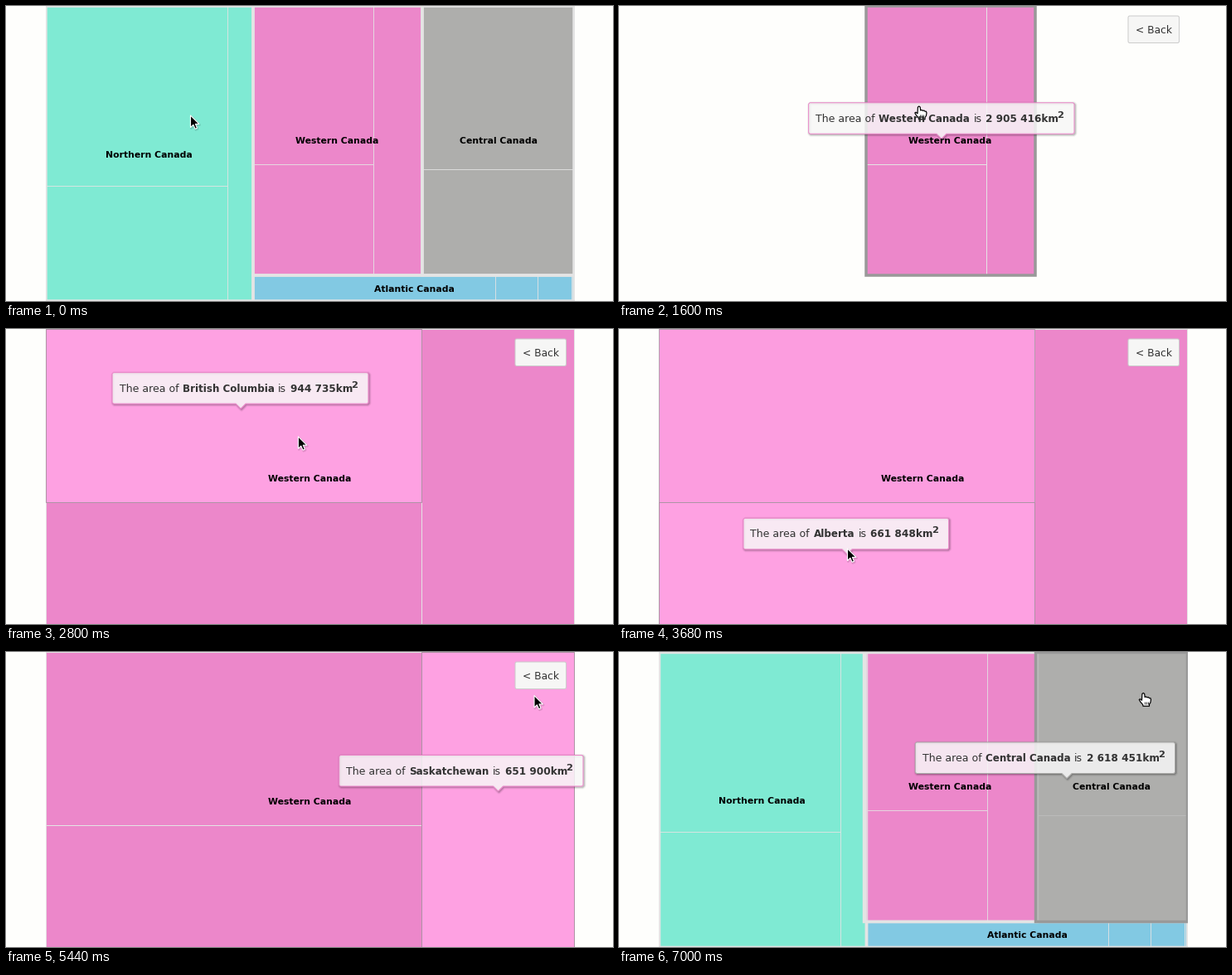
Write a matplotlib script that moves like this. It is 732x356 px and loops after 7040 ms.

```python
import numpy as np
import matplotlib.pyplot as plt
from matplotlib.animation import FuncAnimation
from matplotlib.colors import to_rgb
from matplotlib.patches import Polygon, Rectangle, FancyBboxPatch

W, H, DPI = 732, 356, 100
STEP, LOOP = 40, 7040
PX = 72 / DPI

TEAL, PINK, GRAY, BLUE = "#7fead3", "#ec87ca", "#aeaeac", "#82c9e3"
BRIGHT, LINE, HOT = "#fea1e2", "#e4e4e4", "#999999"
HOT_LEAF = "#ae94a5"
PAPER = "#fefefc"

# Treemap edges
X0, X1, X2, X3 = 47.5, 298.2, 502, 685
Y0, Y1, Y2 = -0.5, 325, 356

DRILL, BACK = 1600, 6040
TO_WEST, TO_BC, TO_ALB, TO_SASK, TO_CENTRAL = 560, 2640, 3440, 4350, 6950
FADE = 1000

fig = plt.figure(figsize=(W / DPI, H / DPI), dpi=DPI, facecolor=PAPER)
ax = fig.add_axes([0, 0, 1, 1])
ax.set_xlim(0, W)
ax.set_ylim(H, 0)
ax.axis("off")
plot_area = Rectangle((48, 0), 637.5, H, transform=ax.transData)


def swing(u):
    return 0.5 - 0.5 * np.cos(np.pi * np.clip(u, 0, 1))


def lerp(a, b, u):
    return np.asarray(a, float) * (1 - u) + np.asarray(b, float) * u


def mix(a, b, u):
    return tuple(lerp(to_rgb(a), to_rgb(b), u))


def heat(t, start, end):
    """1 while hovered, easing back to 0 afterwards."""
    if t < start:
        return 0.0
    return 1 - swing((t - end) / FADE)


def zoom(t, length):
    """0 for the whole map, 1 when Western Canada fills the plot."""
    if t < BACK:
        return swing((t - DRILL - 16) / length)
    return 1 - swing((t - BACK - 28) / length)


# ---------- drawing helpers ----------

def box(l, t, r, b, fill="none", edge="none", lw=1.0, alpha=1.0):
    p = Rectangle((l, t), r - l, b - t, fc=fill, ec=edge, lw=lw * PX,
                  alpha=alpha, joinstyle="miter")
    ax.add_patch(p)
    p.set_clip_path(plot_area)


def poly(pts, fill="none", edge="none", lw=1.0, alpha=1.0):
    ax.add_patch(Polygon(pts, closed=True, fc=fill, ec=edge, lw=lw * PX,
                         alpha=alpha, joinstyle="round"))


def text(x, y, s, px, weight="normal", color="black", ha="left"):
    return ax.text(x, y, s, fontsize=px * PX, family="DejaVu Sans",
                   weight=weight, color=color, ha=ha, va="baseline")


def width(s, px, weight):
    art = text(0, 0, s, px, weight)
    w = art.get_window_extent(fig.canvas.get_renderer()).width
    art.remove()
    return w


# ---------- tooltip ----------

class Tip:
    PAD_L, PAD_R, GAP = 8.5, 12.5, 4.5

    def __init__(self, name, area, color):
        self.color = color
        self.runs = []
        x = self.PAD_L
        for s, px, weight in (("The area of", 12.5, "normal"),
                              (name, 11.9, "bold"),
                              ("is", 12.5, "normal"),
                              (area + "km", 12.1, "bold")):
            self.runs.append((x, 0, s, px, weight))
            x += width(s, px, weight) + self.GAP
        x -= self.GAP + 1.5
        self.runs.append((x, -5, "2", 11.5, "bold"))
        self.w = x + width("2", 11.5, "bold") + self.PAD_R

    def target(self, cx, cy):
        return np.array([np.clip(cx - self.w / 2, 38, 696 - self.w), cy, cx])

    def draw(self, left, cy, tip_x):
        l, r, t, b, c = left, left + self.w, cy - 53, cy - 15.5, 1.5
        pts = [(l + c, t), (r - c, t), (r, t + c), (r, b - c), (r - c, b)]
        if l + 10 < tip_x < r - 10:
            pts += [(tip_x + 6, b), (tip_x, b + 6), (tip_x - 6, b)]
        pts += [(l + c, b), (l, b - c), (l, t + c)]
        pts = np.array(pts)
        for i in (1, 2, 3):
            poly(pts + 1, edge="black", lw=7 - 2 * i, alpha=0.05 * i)
        poly(pts, fill="#f7f7f7", alpha=0.85)
        poly(pts, edge=self.color)
        for dx, dy, s, px, weight in self.runs:
            text(l + dx, cy - 30 + dy, s, px, weight, "#333333")


north = Tip("Northern Canada", "3 921 739", TEAL)
west = Tip("Western Canada", "2 905 416", PINK)
bc = Tip("British Columbia", "944 735", PINK)
alberta = Tip("Alberta", "661 848", PINK)
sask = Tip("Saskatchewan", "651 900", PINK)
central = Tip("Central Canada", "2 618 451", GRAY)

TIPS = [
    (160, north, 172.5, 178),
    (TO_WEST, west, 400, 162),
    (DRILL, west, 366.5, 177.5),
    (TO_BC, bc, 275, 104.5),
    (TO_ALB, alberta, 275, 282),
    (TO_SASK, sask, 593.5, 177.5),
    (BACK, sask, 472.5, 162),
    (TO_CENTRAL, central, 594, 162),
]
RATE = np.array([2 / 3, 1 / 2, 2 / 3])  # share of the distance left per 32 ms


def draw_tip(t):
    pos = tip = None
    ends = [e[0] for e in TIPS[1:]] + [LOOP]
    for (start, nxt, cx, cy), end in zip(TIPS, ends):
        if t < start:
            break
        goal, tip = nxt.target(cx, cy), nxt
        if pos is None:
            pos = goal
        else:
            n = (min(t, end) - start) // 32 + 1
            pos = goal + (pos - goal) * RATE ** n
    if tip:
        tip.draw(*pos)


# ---------- treemap ----------

def west_rect(t):
    return lerp((X1, Y0, X2, Y1), (X0, Y0, X3, Y2 + 0.5), zoom(t, 1000))


def draw_leaves(rects, color):
    for r in rects:
        box(*r, fill=color, edge=LINE)


def draw_west(t):
    z = zoom(t, 1000)
    l, top, r, b = west_rect(t)
    mx, my = l + 0.7115 * (r - l), 0.587 * b
    glow_sask = heat(t, TO_SASK, LOOP) * (z if t >= BACK else 1)
    leaves = [
        (heat(t, TO_BC, TO_ALB), (l, top, mx, my)),
        (heat(t, TO_ALB, TO_SASK), (l, my, mx, b)),
        (glow_sask, (mx, top, r, b)),
    ]
    for h, rect in sorted(leaves):
        box(*rect, fill=mix(PINK, BRIGHT, h), edge=mix(LINE, HOT_LEAF, h))
    if DRILL <= t < BACK and z < 1:
        f = swing((t - DRILL) / FADE)
        box(l, top, r, b, edge=mix(HOT, LINE, f), lw=3.5 - 1.9 * f)


def draw_map(t):
    draw_leaves([(X0, Y0, 267, 217), (X0, 217, 267, Y2), (267, Y0, X1, Y2)],
                TEAL)
    draw_leaves([(X2, Y0, X3, 197), (X2, 197, X3, Y1)], GRAY)
    cuts = [X1, 590, 641, 681.5, X3]
    draw_leaves([(a, Y1, b, Y2) for a, b in zip(cuts, cuts[1:])], BLUE)
    draw_west(t)

    h_west = heat(t, TO_WEST, DRILL) if t < DRILL else 0
    a_west = h_west if t < DRILL else zoom(t, 1000)
    h_north = heat(t, 160, TO_WEST)
    h_central = heat(t, TO_CENTRAL, LOOP)
    parents = [
        (h_north, h_north, (X0, Y0, X1, Y2), TEAL),
        (h_west, a_west, (X1, Y0, X2, Y1), PINK),
        (h_central, h_central, (X2, Y0, X3, Y1), GRAY),
        (0, 0, (X1, Y1, X3, Y2), BLUE),
    ]
    for h, a, rect, color in sorted(parents, key=lambda p: p[0]):
        box(*rect, fill=color, alpha=0.15 + 0.6 * a)
        outline = west_rect(t) if color == PINK else rect
        box(*outline, edge=mix(LINE, HOT, h), lw=3.5 - 1.9 * zoom(t, 1000))


def draw_labels(t, drilled):
    def label(x, y, s):
        text(x, y, s, 10.9, "bold", ha="center")

    x, y = lerp((399.5, 166.5), (366.5, 183.8), zoom(t, 500))
    label(x, y, "Western Canada")
    if not drilled:
        label(172.5, 182.8, "Northern Canada")
        label(594, 166.5, "Central Canada")
        label(492, 345, "Atlantic Canada")


def draw_button(hover):
    ax.add_patch(FancyBboxPatch((614, 12), 61.5, 32.5,
                                boxstyle="round,pad=0,rounding_size=2",
                                fc="#e6e6e6" if hover else "#f6f6f5",
                                ec="#cccccc", lw=PX))
    text(623, 33, "< Back", 12.3, color="#333333")


# ---------- pointer ----------

ARROW = np.array([(0, 0), (0, 14.5), (3.4, 11.3), (5.6, 16.3), (8, 15.2),
                  (5.9, 10.4), (10.4, 10.4)])
HAND = np.array([(-1.6, 1), (-.2, 0), (1.2, 1), (1.6, 5), (3, 4.4), (4.4, 5.4),
                 (5.8, 5), (7, 6.2), (8.4, 6.2), (9, 8), (8.4, 11.5), (7, 13.5),
                 (7, 15.8), (-.5, 15.8), (-.8, 14), (-3.6, 10.8), (-5.2, 8),
                 (-4, 7.2), (-2, 8.8)])
PATH = np.array([
    (120, 222.5, 132), (560, 300, 126), (840, 362, 121),
    (2640, 362, 121), (2840, 350, 132), (3200, 350, 132),
    (3440, 315, 209), (3680, 275.5, 265), (3920, 288, 280),
    (4350, 502, 245), (4640, 585, 212), (5000, 612, 120),
    (5360, 637, 56), (5440, 637, 52.5), (5680, 643.5, 35),
    (6880, 643.5, 35), (7000, 632.5, 49.5)])


def draw_pointer(t):
    pos = np.array([np.interp(t, PATH[:, 0], PATH[:, i]) for i in (1, 2)])
    on_button = 5520 <= t < BACK
    if 160 <= t < TO_BC or on_button or t >= TO_CENTRAL:
        poly(HAND + pos, "white", "black", 1.2)
        for dx in (1, 3.2, 5.4):
            x, y = pos + (dx, 10)
            poly([(x, y), (x, y + 3.5)], edge="black", lw=0.8)
    else:
        poly(ARROW + pos + (0.8, 1.2), edge="black", lw=2.5, alpha=0.12)
        poly(ARROW + pos, "black", "white", 1.1)


def update(i):
    t = i * STEP
    for art in list(ax.patches) + list(ax.texts):
        art.remove()
    drilled = DRILL <= t < BACK
    if drilled:
        draw_west(t)
    else:
        draw_map(t)
    draw_labels(t, drilled)
    if drilled:
        draw_button(t >= 5520)
    draw_tip(t)
    draw_pointer(t)
    return []


anim = FuncAnimation(fig, update, frames=LOOP // STEP, interval=STEP,
                     init_func=lambda: [], repeat=True, repeat_delay=0,
                     blit=False)
plt.show()
```
